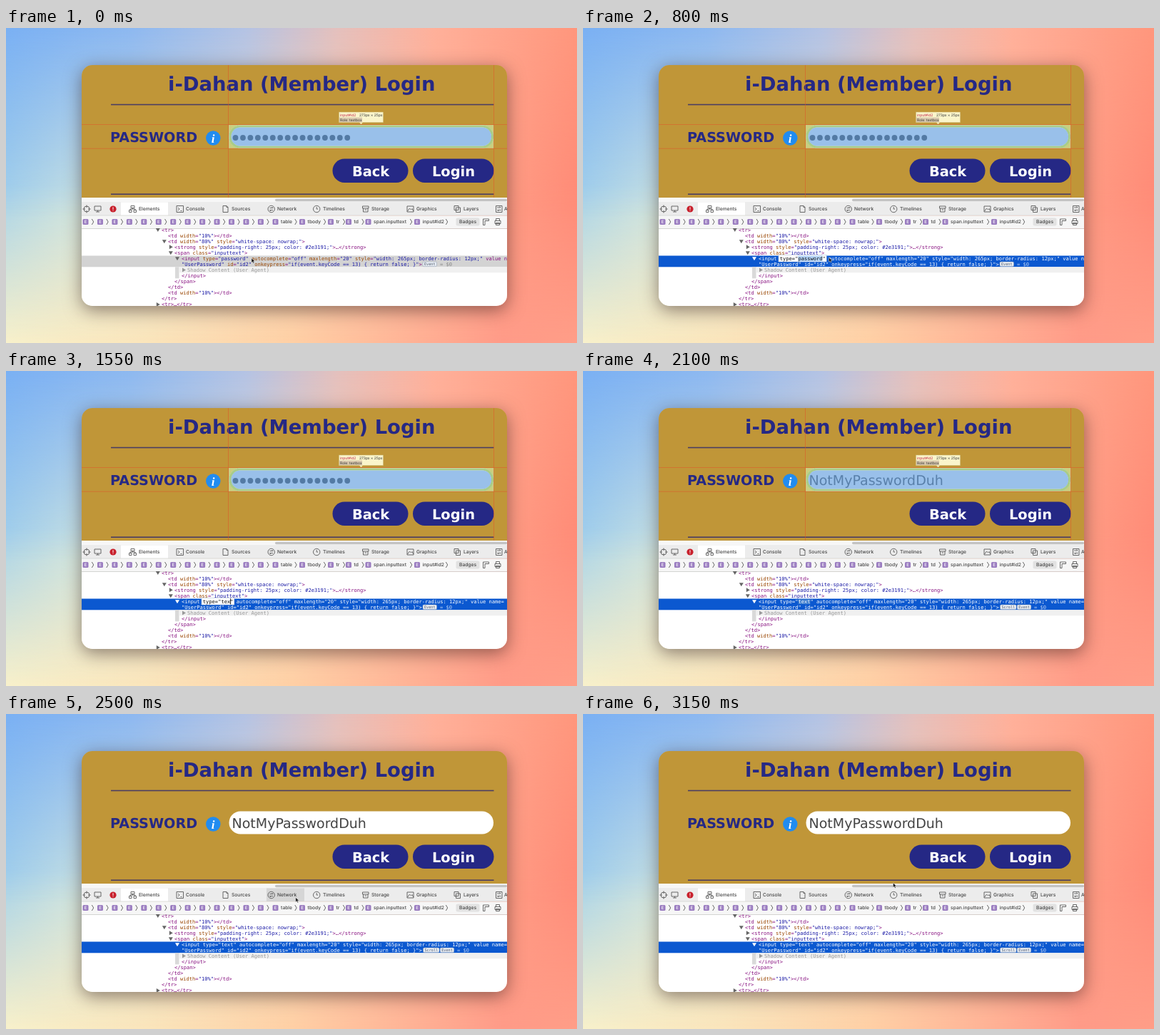
An HTML page that plays this animation: 800x442 px, repeating every 3.25 s.

```html
<!DOCTYPE html>
<html lang="en">
<head>
<meta charset="utf-8">
<title>Password field inspection</title>
<style>
html, body { margin: 0; width: 100%; height: 100%; overflow: hidden; }
body { background: linear-gradient(90deg, #f8f1cb, #fbe5bb 25%, #ffd0a5 50%, #ffb798 68%, #ff9b88 87%, #ff9e88); }
.sky { position: absolute; inset: 0; }
.mid { background: linear-gradient(90deg, #a6d2ea, #cfe5e0 14%, #f0d8c0 50%, #ff9f86 85%, #ff8a77);
  -webkit-mask: linear-gradient(#000 50%, transparent 100%); mask: linear-gradient(#000 50%, transparent 100%); }
.top { background: linear-gradient(90deg, #7ab0f3, #8db8f0 22%, #b4c3e4 42%, #e4c0bd 58%, #ffb09a 75%, #ff967c);
  -webkit-mask: linear-gradient(#000, transparent 60%); mask: linear-gradient(#000, transparent 60%); }
.card { position: absolute; left: 106px; top: 52px; width: 596px; height: 338px; border-radius: 15px;
  box-shadow: 0 6px 24px rgba(40,20,20,.5); }
svg { position: absolute; left: 0; top: 0; display: block; }
text { white-space: pre; text-rendering: geometricPrecision; }
.head { font-family: "DejaVu Sans", Verdana, sans-serif; font-weight: bold; fill: #252885; }
.field { font: 19px "DejaVu Sans", Verdana, sans-serif; fill: #444; }
.ui { font: 500 6.7px Inter, sans-serif; fill: #444; }
.tip { font: 5px Inter, sans-serif; fill: #333; }
.code { font: 7.08px "DejaVu Sans Mono", monospace; fill: #881280; }
.code .name { fill: #994500; }
.code .value { fill: #1a1aa6; }
.code.lit, .code.lit tspan { fill: #fff; }
.icon { fill: none; stroke: #5a5a5a; stroke-width: .9; }
</style>
</head>
<body>
<div class="sky mid"></div>
<div class="sky top"></div>
<div class="card"></div>
<svg id="stage" width="800" height="442" viewBox="0 0 800 442"></svg>
<script>
const CHAR = 4.262, ROW_X = 246;
const rect = (x, y, w, h, fill, more = '') =>
  `<rect x="${x}" y="${y}" width="${w}" height="${h}" fill="${fill}" ${more}/>`;
const text = (x, y, s, cls, more = '') => `<text x="${x}" y="${y}" class="${cls}" ${more}>${s}</text>`;
const icon = (d, more = '') => `<path class="icon" d="${d}" ${more}/>`;
const esc = s => s.replace(/&/g, '&amp;').replace(/</g, '&lt;').replace(/>/g, '&gt;');
const markup = s => esc(s).replace(/([\w-]+)?(=?)("[^"]*")/g, (m, name = '', eq, value) =>
  `<tspan class="name">${name}</tspan>${eq}<tspan class="value">${value}</tspan>`);
const code = (x, y, s, more) => text(x, y, markup(s), 'code', more);
const arrow = (x, y, open) => open
  ? `<path d="M${x - 3} ${y - 2}h6l-3 5z"/>` : `<path d="M${x - 2} ${y - 3}v6l5 -3z"/>`;

function page() {
  const dots = Array.from({ length: 16 }, (_, i) =>
    `<circle cx="${321.5 + i * 10.45}" cy="154" r="3.9"/>`).join('');
  const button = (x, w, tx, s) => rect(x, 183.5, w, 33.5, '#252885', 'rx="16.7"') +
    text(tx, 208, s, 'head', 'font-size="19.4" style="fill:#fff"');
  return rect(106, 52, 596, 186, '#c09638') +
    text(227, 88, 'i-Dahan (Member) Login', 'head', 'font-size="27.4"') +
    rect(147, 106.7, 536.5, 1.6, '#4a3d63') + rect(147, 232.4, 536.5, 1.6, '#4a3d63') +
    text(146, 160, 'PASSWORD', 'head', 'font-size="19.2"') +
    '<circle cx="290.3" cy="154.5" r="10.2" fill="#218cf0"/>' +
    '<text x="290.2" y="160.5" text-anchor="middle" fill="#fff" style="font:italic bold 17px \'Liberation Serif\',serif">i</text>' +
    button(457.5, 106, 485, 'Back') + button(570, 113.5, 597, 'Login') +
    `<g id="margin">${rect(312, 136, 371.5, 33, '#c9cf80')}</g>` +
    rect(312.5, 136.5, 370.5, 32, '#fff', 'rx="16"') +
    `<g id="dots" fill="#333">${dots}</g>` + text(316.5, 160, 'NotMyPasswordDuh', 'field', 'id="plain"') +
    `<g id="hover">
      ${rect(314, 138, 367.5, 29, 'none', 'rx="14" stroke="#a9cc88" stroke-width="3.2"')}
      ${rect(315.5, 139.5, 364.5, 26, '#64a0e0', 'rx="12.5" opacity=".66"')}
      <path d="M311.5 52V238M683.5 52V238M106 135.5H702M106 169.2H702" stroke="#e0552c" stroke-width=".7" opacity=".75"/>
      ${rect(466.5, 118, 62, 14.5, '#faf5cb', 'stroke="#c9b877" stroke-width=".5"')}
      <path d="M495 132.5h5l-2.5 2.5z" fill="#faf5cb"/>
      ${rect(467, 125.5, 32, 6.5, '#d8c8ae')}
      ${text(468, 124, '<tspan fill="#c3264a">input#id2</tspan>', 'tip')}${text(495, 124, '273px × 25px', 'tip')}
      ${text(468, 130.6, 'Role: textbox', 'tip')}
    </g>` +
    rect(106, 52, 596, 182, '#64a0d8', 'id="veil" opacity=".62"');
}

function toolbar() {
  const tabs = [[186, 'Elements'], [252, 'Console'], [316, 'Sources'], [380, 'Network'], [444, 'Timelines'],
    [512, 'Storage'], [575, 'Graphics'], [641, 'Layers'], [698, 'Audit']];
  const icons = 'M175 249.5h5v3h-5zM172.500 255.500h3.500v3h-3.500zM179 255.500h3.500v3h-3.500zM177.500 252.500v1.500M174 255.500v-1.500h7v1.500' +
    'M239 249.500h9.500v9h-9.500zM241 252l2 2l-2 2M244.500 256.500h2' +
    'M304 249.500h5l2 2v7h-7zM309 249.500v2h2' +
    'M367 254a4.700 4.700 0 1 0 9.400 0a4.700 4.700 0 1 0 -9.400 0M369.500 252.500h4.500l-1.500 -1.500M374 255.500h-4.500l1.500 1.500' +
    'M430.500 254a4.700 4.700 0 1 0 9.400 0a4.700 4.700 0 1 0 -9.400 0M435.200 251v3h2' +
    'M499.500 250h8.500v3h-8.500zM500.500 253v5h6.500v-5M502.500 255h2.500' +
    'M562 250h9v8h-9zM562.500 257l3 -4l2 2l1.500 -1.500l2 3.500' +
    'M628 249.500h6v6h-6zM630.500 252h6v6.500h-6z' +
    'M686.500 249.500h8.500v9h-8.500zM688 252h5l-1.500 -1.500M693.500 255.500h-5l1.500 1.500' +
    'M109 254a4 4 0 1 0 8 0a4 4 0 1 0 -8 0M113 248.500v3.500M113 256v3.500M107.500 254h3.500M115 254h3.500' +
    'M124 250h9v6h-9zM126 258h5M128.500 256v2';
  return rect(106, 238, 596, 6, '#f7f7f7') + rect(377, 239.8, 325, 3.4, '#c3c3c3', 'rx="1.7"') +
    rect(106, 244, 596, 19, '#ececec') + rect(161, 244.5, 66, 18.5, '#fff') +
    rect(365, 244.5, 53, 18.5, '#d6d6d6', 'id="tabHover"') +
    icon(icons) +
    '<circle cx="150" cy="254" r="4.6" fill="#c8202c"/>' + rect(149.5, 251.3, 1, 3.4, '#fff') + rect(149.5, 255.5, 1, 1, '#fff') +
    tabs.map(([x, s]) => text(x, 256.4, s, 'ui')).join('') +
    rect(106, 262.700, 596, .7, '#c9c9c9');
}

function crumbs() {
  const named = [[377.5, 'table', 406], [415, 'tbody', 446.5], [455, 'tr', 473.5], [480, 'td', 500],
    [507.5, 'span.inputtext', 567.5], [576, 'input#id2', 617.5]];
  const badge = x => rect(x - 4, 268, 8, 8, '#9a7cc0', 'rx="1.5"') +
    text(x, 274.2, 'E', 'ui', 'text-anchor="middle" style="fill:#fff;font-size:6px"');
  const chevron = x => icon(`M${x - 1.2} 268l2.4 4l-2.4 4`);
  let out = rect(106, 263.4, 596, 18, '#f6f6f6');
  for (let i = 0; i < 13; i++) out += badge(111.5 + i * 20.45) + chevron(121.5 + i * 20.45);
  for (const [x, s, end] of named) out += badge(x) + text(x + 7.6, 274.4, s, 'ui') + chevron(end);
  return out + rect(630.5, 266.5, 33, 11, '#e2e2e2', 'rx="2"') + text(635, 274.4, 'Badges', 'ui') +
    icon('M668.500 276.500v-8.500h8M668.500 276.500h2.500v-6h5.500v-2.500M685 270.500h8v4h-8zM686.500 270.500v-3h5v3M686.500 273.500h5v3h-5z') +
    rect(106, 281.2, 596, .8, '#cfcfcf');
}

function source() {
  // [x, line index, markup, arrow: 1 open, 0 closed]
  const lines = [
    [218, 0, '<tr>', 1], [227, 1, '<td width="10%"></td>'],
    [227, 2, '<td width="80%" style="white-space: nowrap;">', 1],
    [236, 3, '<strong style="padding-right: 25px; color: #2e3191;">…</strong>', 0],
    [236, 4, '<span class="inputtext">', 1],
    [246, 8, '</input>'], [236, 9, '</span>'], [227, 10, '</td>'],
    [227, 11, '<td width="10%"></td>'], [218, 12, '</tr>'], [218, 13, '<tr>…</tr>', 0]];
  const y = i => 285.7 + i * 8.06;
  const chip = (id, s, w) => `<g id="${id}">${rect(0, 328, w, 6.6, '#e9eef5', 'rx="1.5" stroke="#8a99ad" stroke-width=".5"')}` +
    text(2, 333.2, s, 'code', 'style="font-size:5.2px;fill:#4a5568"') + '</g>';
  return rect(106, 282, 596, 108, '#fff') +
    `<g fill="#666">${lines.filter(l => l.length > 3).map(([x, i, , open]) => arrow(x - 5.2, y(i) - 2.6, open)).join('')}</g>` +
    lines.map(([x, i, s]) => code(x, y(i), s)).join('') +
    rect(106, 319.5, 596, 15.8, '#d3d3d3', 'id="row"') +
    rect(243, 335.3, 459, 8, '#f0f0f0') + rect(237, 335.3, 5.5, 16, '#d9d9d9') +
    `<g fill="#999">${arrow(249, 339.6, 0)}</g>` +
    text(254, y(7), 'Shadow Content (User Agent)', 'code', 'style="fill:#999"') +
    `<g id="rowArrow">${arrow(240, 323.2, 1)}</g>` +
    rect(ROW_X + 13 * CHAR, 320, 4 * CHAR, 7.2, '#bfe0c8', 'id="flash"') +
    code(ROW_X, y(5), '', 'id="line1"') +
    code(ROW_X, y(6), '"UserPassword" id="id2" onkeypress="if(event.keyCode == 13) { return false; }">', 'id="line2"') +
    chip('scroll', 'Scroll', 22.500) + chip('event', 'Event', 19.500) +
    text(0, y(6), '= $0', 'code', 'id="dollar"') +
    `<g id="edit">${rect(274, 318.6, 10, 9.4, '#fff', 'id="box" stroke="#b9c7dc" stroke-width=".6"')}
      ${rect(ROW_X + 13 * CHAR, 319.6, 8 * CHAR, 7.8, '#b3d3f7', 'id="picked"')}
      ${text(ROW_X + 7 * CHAR, y(5), '', 'code', 'id="typed" style="fill:#111"')}
      ${rect(0, 319.2, .9, 8.2, '#111', 'id="caret"')}</g>`;
}

document.getElementById('stage').innerHTML =
  `<clipPath id="cut">${rect(106, 52, 596, 338, '#000', 'rx="15"')}</clipPath>
  <g clip-path="url(#cut)">${page()}${toolbar()}${crumbs()}${source()}</g>
  <path id="mouse" d="M0 0v6.200l1.500 -1.300l1.100 2.300l1.100 -.500l-1.100 -2.300h2z" fill="#111" stroke="#fff" stroke-width=".4"/>`;

const $ = id => document.getElementById(id);
const show = (id, on) => $(id).style.display = on ? '' : 'none';
const set = (id, name, value) => $(id).setAttribute(name, value);

const path = [[0, 344, 323], [800, 344.5, 322], [2150, 345, 322], [2400, 396.5, 262.5],
  [2550, 410.5, 255], [2850, 431, 241], [3000, 434.5, 237], [3250, 434.5, 237]];
function mouseAt(t) {
  const i = path.findIndex(p => p[0] > t), [t0, x0, y0] = path[i - 1], [t1, x1, y1] = path[i];
  const k = (t - t0) / (t1 - t0);
  return [x0 + (x1 - x0) * k, y0 + (y1 - y0) * k];
}

const typing = [[0, 'password'], [1250, ''], [1300, 't'], [1400, 'te'], [1500, 'tex'], [1600, 'text']];

function draw(now) {
  const t = Math.floor(now % 3250 / 50) * 50;
  const kind = typing.filter(k => k[0] <= t).pop()[1];
  const lit = t >= 300, editing = t >= 500 && t < 1750, done = t >= 1800;
  const hover = t < 2300, ink = lit ? '#fff' : '#666';

  set('row', 'fill', lit ? '#0b58d0' : '#d3d3d3');
  set('rowArrow', 'fill', ink);
  $('line1').innerHTML = markup(`<input type="${kind}" autocomplete="off" maxlength="20" style="width: 265px; border-radius: 12px;" value name=`);
  for (const id of ['line1', 'line2']) $(id).classList.toggle('lit', lit);

  show('edit', editing);
  const label = `type="${kind}"`;
  $('typed').textContent = label;
  set('box', 'width', label.length * CHAR + 3.2);
  show('picked', t < 1250);
  show('caret', t >= 1250);
  set('caret', 'x', ROW_X + (13 + kind.length) * CHAR);
  set('flash', 'opacity', t >= 1750 ? Math.max(0, .6 - (t - 1750) / 1000) : 0);

  const end = 584.5;
  show('scroll', done);
  set('scroll', 'transform', `translate(${end})`);
  set('event', 'transform', `translate(${done ? end + 23.7 : end - .5})`);
  set('dollar', 'x', done ? 632 : 608);
  $('dollar').style.fill = lit ? '#bcd2f5' : '#888';

  show('dots', !done);
  show('plain', done);
  show('hover', hover);
  show('margin', hover);
  show('veil', t >= 2300 && t < 2500);
  show('tabHover', t >= 2500 && t < 2700);

  show('mouse', t < 1250 || t >= 2200);
  set('mouse', 'transform', `translate(${mouseAt(t)})`);
}

const start = performance.now();
function tick() {
  draw(performance.now() - start);
  requestAnimationFrame(tick);
}
tick();
</script>
</body>
</html>
```
